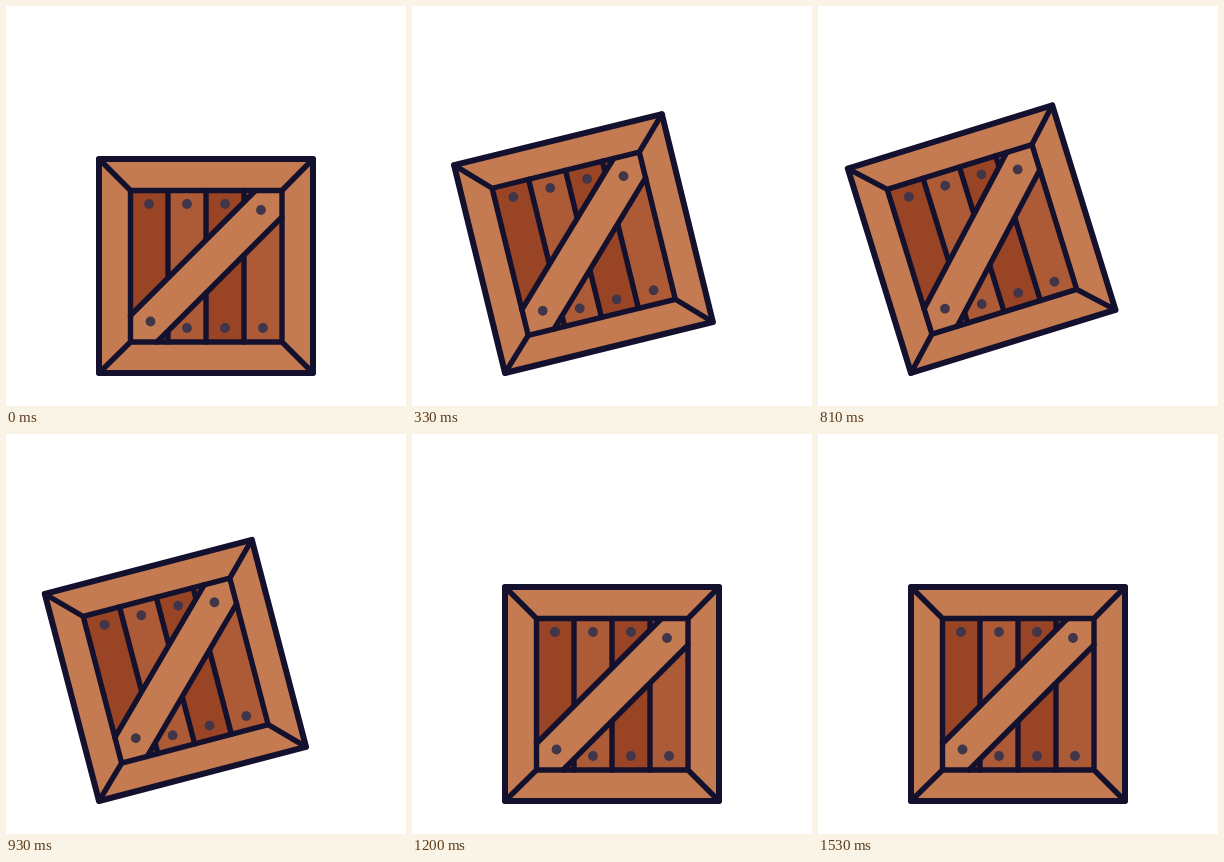
An HTML page for the animation above (1.86 s loop, 400x400 px).

```html
<!DOCTYPE html>
<html lang="en">
<head>
<meta charset="utf-8">
<title>Tipping crate</title>
<style>
  html, body { margin: 0; width: 100%; height: 100%; overflow: hidden; background: #fff; }
  svg { display: block; width: 100vw; height: 100vh; }
  .line { fill: none; stroke: #14112f; stroke-width: 5.4; stroke-linecap: round; stroke-linejoin: round; }
  .light { fill: #c57b51; }
  .mid { fill: #ad5b36; }
  .dark { fill: #994424; }
  .nails { fill: #403549; }
</style>
</head>
<body>
<svg viewBox="0 0 400 400">
  <g id="crate">
    <rect class="light" x="93" y="153" width="214" height="214"/>
    <rect class="mid" x="124.5" y="184.5" width="151.5" height="151.5"/>
    <path class="dark" d="M124.5 184.5H162V336H124.5zM200 184.5H238V336H200z"/>
    <path class="line" d="M162 184.5V336M200 184.5V336M238 184.5V336"/>
    <path class="light" d="M124.5 309.5L249.5 184.5H276V211L151 336H124.5z"/>
    <path class="line" stroke-linecap="butt" d="M124.5 309.5L249.5 184.5M276 211L151 336"/>
    <path class="line" d="M124.5 184.5H276V336H124.5zM93 153L124.5 184.5M307 153L276 184.5M307 367L276 336M93 367L124.5 336"/>
    <rect class="line" style="stroke-width:6" x="93" y="153" width="214" height="214"/>
    <g class="nails" id="nails"></g>
  </g>
</svg>
<script>
const LOOP = 1860, STEP = 30;
const PEAK = 640, LAND = 1195, BOUNCE = 1200, REST = 1530;
const TILT = 18, HOP = 2.6;

const nails = [[143, 198], [181, 198], [219, 198], [255, 204],
               [144.5, 315.5], [181, 322], [219, 322], [257, 322]];
document.getElementById('nails').innerHTML =
  nails.map(([x, y]) => `<circle cx="${x}" cy="${y}" r="4.9"/>`).join('');

const crate = document.getElementById('crate');

// Tilt in degrees: slow to the top, drop, then one small hop.
function tilt(t) {
  if (t < PEAK) return TILT * (1 - (1 - t / PEAK) ** 2);
  if (t < LAND) return TILT * (1 - ((t - PEAK) / (LAND - PEAK)) ** 2.6);
  if (t < BOUNCE || t >= REST) return 0;
  const u = (t - BOUNCE) / (REST - BOUNCE);
  return HOP * 4 * u * (1 - u);
}

function draw() {
  const t = Math.floor(performance.now() % LOOP / STEP) * STEP;
  crate.setAttribute('transform', `rotate(${-tilt(t)} 93 367)`);
  requestAnimationFrame(draw);
}
draw();
</script>
</body>
</html>
```
